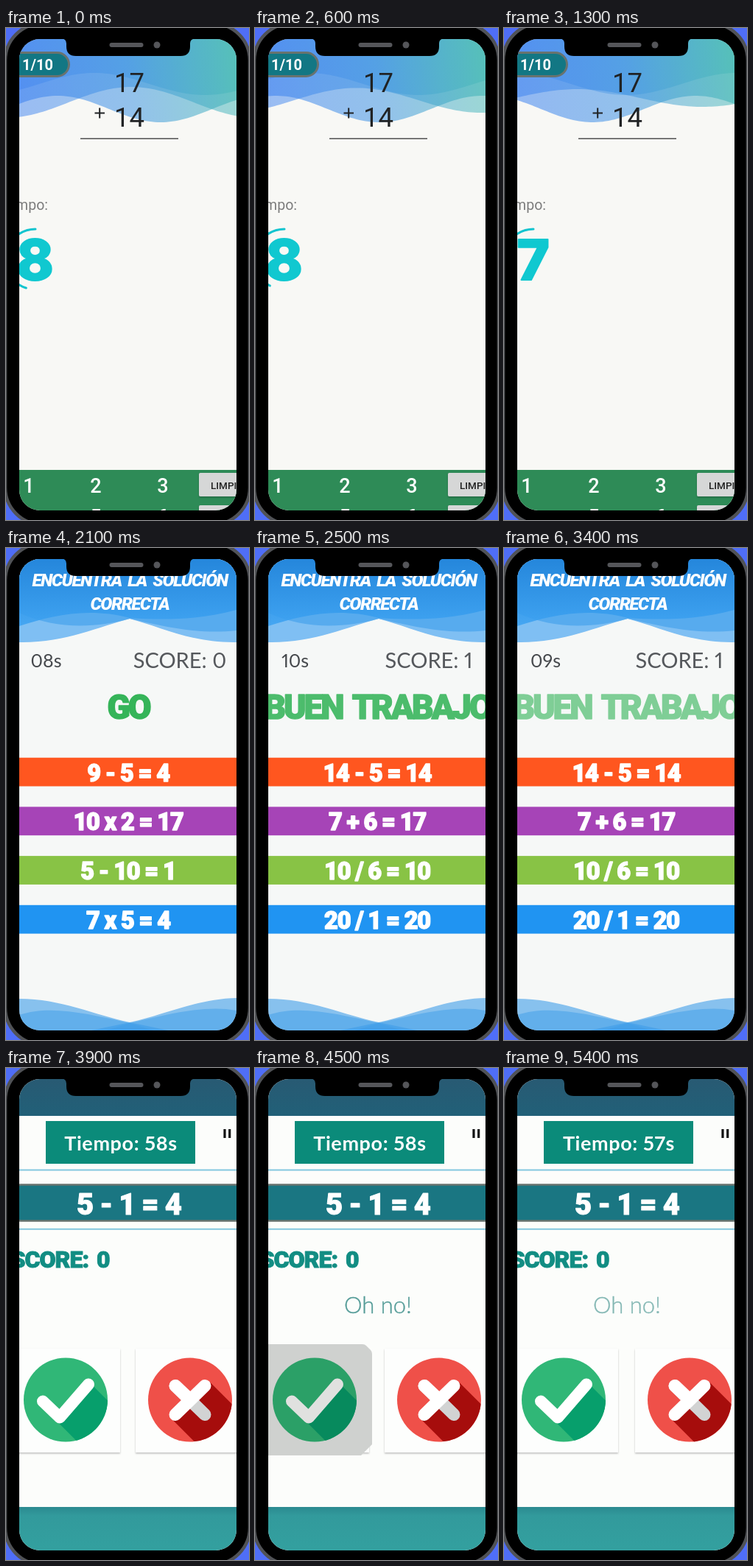
An HTML page for the animation above (5.5 s loop, 330 px wide and 668 px high).

```html
<!DOCTYPE html>
<html lang="es">
<head>
<meta charset="utf-8">
<style>
html, body { margin: 0; width: 100%; height: 100%; overflow: hidden; background: #4f6ef7; }
svg { display: block; width: 100vw; height: 100vh; }
text { font-family: Roboto, sans-serif; }
.heavy { font-weight: 900; stroke-linejoin: round; }
.soft { font-family: Lato, sans-serif; font-variant-numeric: proportional-nums; }
.mid { text-anchor: middle; }
.end { text-anchor: end; }
</style>
</head>
<body>
<svg viewBox="0 0 330 668" preserveAspectRatio="none">
  <defs>
    <clipPath id="screen"><rect x="18" y="15" width="295" height="640" rx="28"/></clipPath>
    <clipPath id="disc"><circle r="57"/></clipPath>
    <linearGradient id="sea" gradientUnits="userSpaceOnUse" x1="18" y1="90" x2="313" y2="40">
      <stop stop-color="#347cf0"/><stop offset=".5" stop-color="#358fe2"/><stop offset="1" stop-color="#37b5ae"/>
    </linearGradient>
    <linearGradient id="sky" x2="0" y2="1">
      <stop stop-color="#1c80d8"/><stop offset="1" stop-color="#3ba2f2"/>
    </linearGradient>
    <linearGradient id="foot" x2="0" y2="1">
      <stop stop-color="#2b8a90"/><stop offset=".2" stop-color="#329a9c"/><stop offset="1" stop-color="#33a09f"/>
    </linearGradient>
    <linearGradient id="head" x2="0" y2="1">
      <stop stop-color="#285a73"/><stop offset="1" stop-color="#216078"/>
    </linearGradient>
    <filter id="lift" x="-10%" y="-10%" width="120%" height="120%">
      <feDropShadow dx="0" dy="1.5" stdDeviation="1.2" flood-opacity=".25"/>
    </filter>
  </defs>

  <rect width="330" height="668" fill="#4f6ef7"/>
  <rect x="-1" y="-6" width="332" height="680" rx="50" fill="#000" stroke="#505256" stroke-width="4.500"/>

  <g clip-path="url(#screen)">
    <g id="sum">
      <rect x="18" y="15" width="295" height="640" fill="#f8f8f5"/>
      <g fill="url(#sea)">
        <path id="waveA" opacity=".52"/><path id="waveB" opacity=".48"/><path id="waveC" opacity=".35"/>
      </g>
      <rect x="-20" y="33.5" width="105.5" height="32" rx="16" fill="#127784" stroke="#68736f" stroke-width="3"/>
      <text x="43" y="57" class="mid" font-size="20" font-weight="700" fill="#fff">1/10</text>
      <g font-size="36.5" fill="#202224" class="end">
        <text x="188" y="87">17</text>
        <text x="188" y="134">14</text>
      </g>
      <path d="M120.500 115.500h13.500M127.200 108.500v14" stroke="#202224" stroke-width="2"/>
      <path d="M101 150.200H234" stroke="#505050" stroke-width="1.500"/>
      <text x="57" y="247" class="end" font-size="19.5" fill="#7d7d7d">Tiempo:</text>
      <path id="ring" fill="none" stroke="#12c4cf" stroke-width="3" stroke-linecap="round"/>
      <text id="count" x="39.500" y="342" class="mid" font-size="76"
        style="font-family:Inter,sans-serif;font-weight:800" fill="#10c8d0" stroke="#10c8d0" stroke-width="2" stroke-linejoin="round"></text>
      <rect x="18" y="600" width="295" height="55" fill="#2e8b57"/>
      <g class="mid" font-size="27" font-weight="500" fill="#fff">
        <text x="31" y="631">1</text><text x="122" y="631">2</text><text x="213" y="631">3</text>
        <text x="31" y="673">4</text><text x="122" y="673">5</text><text x="213" y="673">6</text>
      </g>
      <g fill="#d6d7d7" filter="url(#lift)">
        <rect x="262" y="604" width="90" height="32" rx="2"/><rect x="262" y="648" width="90" height="32" rx="2"/>
      </g>
      <text x="278" y="626" font-size="13.5" font-weight="500" fill="#222">LIMPIAR</text>
    </g>

    <g id="quiz">
      <rect x="18" y="15" width="295" height="640" fill="#f6f8f7"/>
      <path d="M18 15H313V128C252 129 210 107 168 96C125 107 80 129 18 128Z" fill="#7fbff3"/>
      <path d="M18 15H313V112C262 118 212 106 168 96C124 108 70 112 18 88Z" fill="#4ea7ee" opacity=".8"/>
      <path d="M18 15H313V84C262 98 215 98 168 95C110 80 62 92 18 106Z" fill="url(#sky)" opacity=".85"/>
      <g fill="#3f9dea">
        <path d="M18 612C75 612 120 634 168 644L220 655H18Z" opacity=".6"/>
        <path d="M313 611C260 612 215 634 168 644L116 655H313Z" opacity=".6"/>
        <path d="M18 634C60 620 110 632 168 645L200 655H18Z" opacity=".5"/>
        <path d="M313 628C272 620 226 632 168 645L136 655H313Z" opacity=".5"/>
      </g>
      <g class="heavy mid" font-size="24" font-style="italic" letter-spacing="-1.500" word-spacing="4" fill="#fff">
        <text x="168" y="52">ENCUENTRA LA SOLUCIÓN</text>
        <text x="168" y="84">CORRECTA</text>
      </g>
      <g id="status" class="mid" fill="#45484c">
        <text id="clock" class="soft" x="54.500" y="162" font-size="25"></text>
        <text id="score" class="soft" x="236" y="163" font-size="29" fill="#55585c"></text>
      </g>
      <text id="cheer" x="166" y="232" class="heavy mid" font-size="46" letter-spacing="-3" word-spacing="6"
        fill="#2fb254" stroke="#2fb254" stroke-width="1.500"></text>
      <g id="bars"></g>
    </g>

    <g id="truth">
      <rect x="18" y="15" width="295" height="640" fill="#fcfdfb"/>
      <rect x="18" y="15" width="295" height="50" fill="url(#head)"/>
      <rect x="18" y="596" width="295" height="59" fill="url(#foot)"/>
      <rect x="54" y="72" width="203" height="58" fill="#0b8b7a"/>
      <text id="left" x="156" y="112" class="soft mid" font-size="27" font-weight="700" letter-spacing=".6" fill="#fff"></text>
      <path d="M297 83v12M303.700 83v12" stroke="#111" stroke-width="3.200"/>
      <path d="M18 138.500H313M18 218.700H313" stroke="#83c8df" stroke-width="2"/>
      <rect x="15" y="158.500" width="302" height="49" rx="5" fill="#1a7682" stroke="#68736f" stroke-width="2.500"/>
      <text x="167" y="198.500" class="heavy mid" font-size="40" letter-spacing="-1" fill="#fff" stroke="#fff">5 - 1 = 4</text>
      <text id="points" y="271" class="heavy end" font-size="32" letter-spacing="-1" word-spacing="4" fill="#128d83" stroke="#128d83">SCORE: 0</text>
      <text id="ohno" x="167" y="333" class="soft mid" font-size="31" font-weight="300" fill="#2d8580" stroke="#2d8580" stroke-width=".4">Oh no!</text>
      <rect x="6" y="381" width="149" height="141" fill="#fdfefd" filter="url(#lift)"/>
      <path id="press" d="M0 375H146Q149 375 151 377L157 383Q159 385 159 388V511L144 526H0Z" fill="#cfd1cf"/>
      <g transform="translate(81 450.500)">
        <circle id="yes" r="57"/>
        <path id="yesShade" clip-path="url(#disc)" d="M-34 7L34 75H90V34L36 -20L-8 24Z"/>
        <path id="tick" d="M-31 2L-8 24L31 -21" fill="none" stroke-width="16" stroke-linecap="round" stroke-linejoin="round"/>
      </g>
      <g id="noCard">
        <rect x="176" y="381" width="149" height="141" fill="#fdfefd" filter="url(#lift)"/>
        <g transform="translate(250 450.500)">
          <circle r="57" fill="#ef5049"/>
          <path clip-path="url(#disc)" d="M-25 26L24 75H90V39L27 -24L0 0Z" fill="#a60d0c"/>
          <g fill="none" stroke="#fff" stroke-width="17" stroke-linecap="round">
            <path d="M-20 -19L20 20" stroke="#d2d3d3"/>
            <path d="M-20 -19L0 0M20 -19L-20 20"/>
          </g>
        </g>
      </g>
    </g>
  </g>

  <path d="M75 14Q82 15 82 21V25Q82 38 95 38H237Q250 38 250 25V21Q250 15 257 14Z"/>
  <rect x="140.500" y="20" width="46" height="6" rx="3" fill="#55565a"/>
  <circle cx="205" cy="23" r="4.500" fill="#55565a"/>
</svg>
<script>
const LOOP = 5500, STEP = 100;
const $ = id => document.getElementById(id);
const set = (id, attr, val) => $(id).setAttribute(attr, val);
const say = (id, str) => { if ($(id).textContent !== str) $(id).textContent = str; };
const show = (id, on) => set(id, 'display', on ? 'inline' : 'none');
const clamp = v => Math.max(0, Math.min(1, v));
const ramp = (t, a, b) => clamp((t - a) / (b - a));

const rounds = [
  ['9 - 5 = 4', '10 x 2 = 17', '5 - 10 = 1', '7 x 5 = 4'],
  ['14 - 5 = 14', '7 + 6 = 17', '10 / 6 = 10', '20 / 1 = 20']
];
$('bars').innerHTML = ['#ff561f', '#a644b7', '#88c345', '#2094f2'].map((fill, i) => {
  const y = 284.7 + i * 66.7;
  return `<rect x="18" y="${y}" width="295" height="38.800" fill="${fill}"/>
    <text id="ans${i}" x="166" y="${y + 32}" class="heavy mid" font-size="32.500" letter-spacing="-1.200" fill="#fff" stroke="#fff" stroke-width="1.400"></text>`;
}).join('');

function wave(base, amp, len, x0) {
  let d = 'M18 15';
  for (let x = 18; x <= 314; x += 4)
    d += `L${x} ${(base + amp * Math.cos(2 * Math.PI * (x - x0) / len)).toFixed(2)}`;
  return d + 'V15Z';
}

function drawSum(t) {
  const s = t / 1000, k = s / 1.3;
  set('waveA', 'd', wave(110, 18, 280, 210 - 69 * s));
  set('waveB', 'd', wave(101 - 6 * k, 21 - 9 * k, 340, -54 * s));
  set('waveC', 'd', wave(76, 15, 300, 270 - 80 * s));
  // the ring drains over 20 s
  const a = (9 - s) / 20 * 2 * Math.PI, r = 41;
  const x = 40 - r * Math.sin(a), y = 314 - r * Math.cos(a);
  set('ring', 'd', `M40 ${314 - r}A${r} ${r} 0 0 0 ${x} ${y}`);
  say('count', s < 1 ? '8' : '7');
}

function drawQuiz(t) {
  const next = t >= 2300;
  say('clock', !next ? '08s' : t < 3200 ? '10s' : '09s');
  say('score', next ? 'SCORE: 1' : 'SCORE: 0');
  set('status', 'transform', `translate(${2 * ramp(t, 2500, 3400)} 0)`);
  say('cheer', next ? 'BUEN TRABAJO' : 'GO');
  set('cheer', 'opacity', next ? 0.85 - (t - 2500) * 0.00028 : 0.97 - (t - 2100) * 0.00028);
  rounds[next ? 1 : 0].forEach((str, i) => say('ans' + i, str));
}

function drawTruth(t) {
  say('left', `Tiempo: ${t < 3900 ? 59 : t < 4900 ? 58 : 57}s`);
  const down = ramp(t, 4100, 4300) * (1 - ramp(t, 4500, 4800));
  const shift = 2 * ramp(t, 4500, 5400);
  set('press', 'opacity', down);
  set('yes', 'fill', down > 0.5 ? '#2ba067' : '#30b777');
  set('yesShade', 'fill', down > 0.5 ? '#078a5d' : '#079f6c');
  set('tick', 'stroke', down > 0.5 ? '#e0e1df' : '#fff');
  set('noCard', 'transform', `translate(${shift} 0)`);
  set('points', 'x', 140.5 + shift);
  set('ohno', 'opacity', t < 4200 ? 0 : 0.8 - (t - 4500) * 0.00025);
}

function draw(now) {
  const t = Math.floor(now % LOOP / STEP) * STEP;
  const scene = t < 1900 ? 0 : t < 3700 ? 1 : 2;
  ['sum', 'quiz', 'truth'].forEach((id, i) => show(id, i === scene));
  [drawSum, drawQuiz, drawTruth][scene](t);
}

let start;
function tick(now) {
  start ??= now;
  draw(now - start);
  requestAnimationFrame(tick);
}
draw(0);
requestAnimationFrame(tick);
</script>
</body>
</html>
```
